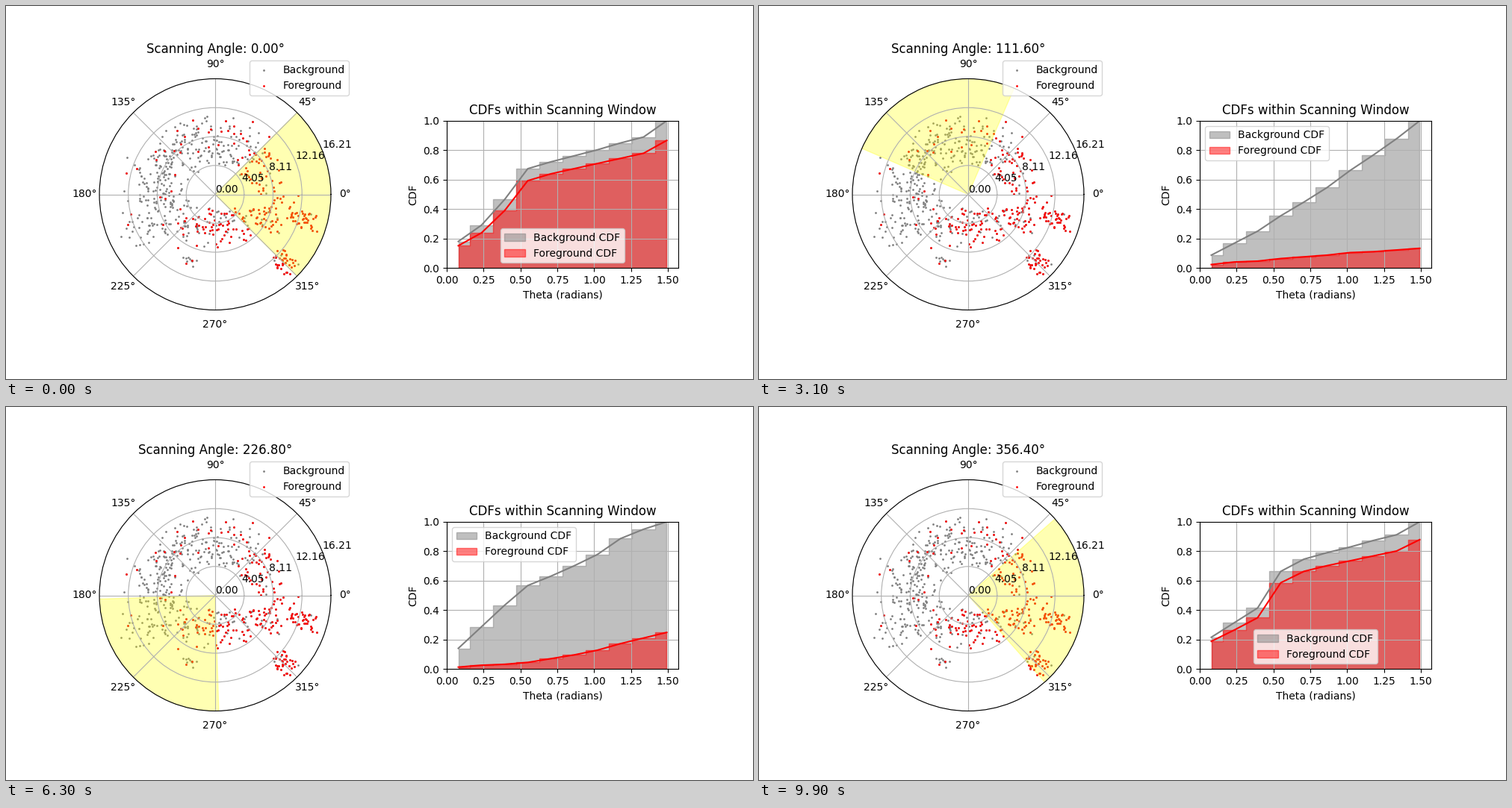
Write a matplotlib script that moves like this. It is 1000 px wide and 500 px high and loops after 10000 ms.

```python
import numpy as np
import matplotlib.pyplot as plt
from matplotlib.animation import FuncAnimation

FRAMES = 100
INTERVAL = 100
R_MAX = 16.214
R_PIXELS = 155
WINDOW = np.pi / 2
BINS = 10

rng = np.random.default_rng(7)
back, fore = [], []


def spread(group, count, start, end, radius, reach, bend=1.0):
    """Even angles with jitter; bend shifts their density along the arc."""
    u = (np.arange(count) + rng.random(count)) / max(count, 1)
    theta = np.radians(start + (end - start) * u ** bend)
    mid, half = radius + 20 * u * (bend != 1), reach + 28 * u * (bend != 1)
    r = rng.triangular(mid - half, mid, mid + half)
    group.append((theta, r * R_MAX / R_PIXELS))


def cluster(start, end, radius, reach, n_back, n_fore):
    spread(back, n_back, start, end, radius, reach)
    spread(fore, n_fore, start, end, radius, reach)


# Wide ring over the upper left, growing wider as it turns
spread(back, 308, 36, 216, 68, 35, bend=0.7)
spread(fore, 57, 36, 216, 72, 30, bend=2.2)
# Denser groups around the rest of the scan
cluster(0, 36, 68, 36, 5, 24)
cluster(216, 243, 60, 36, 21, 12)
cluster(243, 324, 48, 32, 22, 55)
cluster(243, 255, 95, 10, 9, 2)
cluster(310, 321, 129, 19, 3, 36)
cluster(324, 342, 72, 34, 8, 30)
cluster(339, 349, 122, 24, 1, 38)
cluster(342, 360, 85, 36, 0, 16)

everything = np.hstack(back + fore)
fore = np.hstack(fore)

fig = plt.figure(figsize=(10, 5), dpi=100)
fig.subplots_adjust(wspace=0.5)
polar = fig.add_subplot(1, 2, 1, projection="polar")
cdf = fig.add_subplot(1, 2, 2)

polar.scatter(*everything, s=1, color="gray", label="Background")
polar.scatter(*fore, s=1, color="red", label="Foreground")
wedge = polar.bar(0, R_MAX, width=WINDOW, color="yellow",
                  edgecolor="yellow", alpha=0.3)[0]
polar.set_ylim(0, R_MAX)
rings = np.linspace(0, R_MAX, 5)
polar.set_yticks(rings, [f"{r:.2f}" for r in rings])
polar.legend(loc="upper right", bbox_to_anchor=(1.1, 1.1))

cdf.set_xlim(0, WINDOW)
cdf.set_ylim(0, 1)
cdf.set_aspect("equal")
cdf.set_xlabel("Theta (radians)")
cdf.set_ylabel("CDF")
cdf.set_title("CDFs within Scanning Window")
cdf.grid(True)

edges = np.linspace(0, WINDOW, BINS + 1)
centers = (edges[:-1] + edges[1:]) / 2
drawn = []


def running_count(theta, start):
    offset = (theta - start) % (2 * np.pi)
    return np.cumsum(np.histogram(offset, bins=edges)[0])


def draw_curve(values, color, label):
    fill = cdf.fill_between(centers, values, step="mid", color=color,
                            alpha=0.5, label=label)
    line, = cdf.plot(centers, values, color=color)
    drawn.extend([fill, line])


def update(frame):
    degrees = frame * 360 / FRAMES
    start = np.radians(degrees) - WINDOW / 2
    polar.set_title(f"Scanning Angle: {degrees:.2f}°")
    wedge.set_x(start)

    while drawn:
        drawn.pop().remove()
    total = running_count(everything[0], start)
    part = running_count(fore[0], start)
    draw_curve(total / total[-1], "gray", "Background CDF")
    draw_curve(part / total[-1], "red", "Foreground CDF")
    cdf.legend(loc="best")
    return []


anim = FuncAnimation(fig, update, frames=FRAMES, interval=INTERVAL,
                     repeat=True, repeat_delay=0)
plt.show()
```
